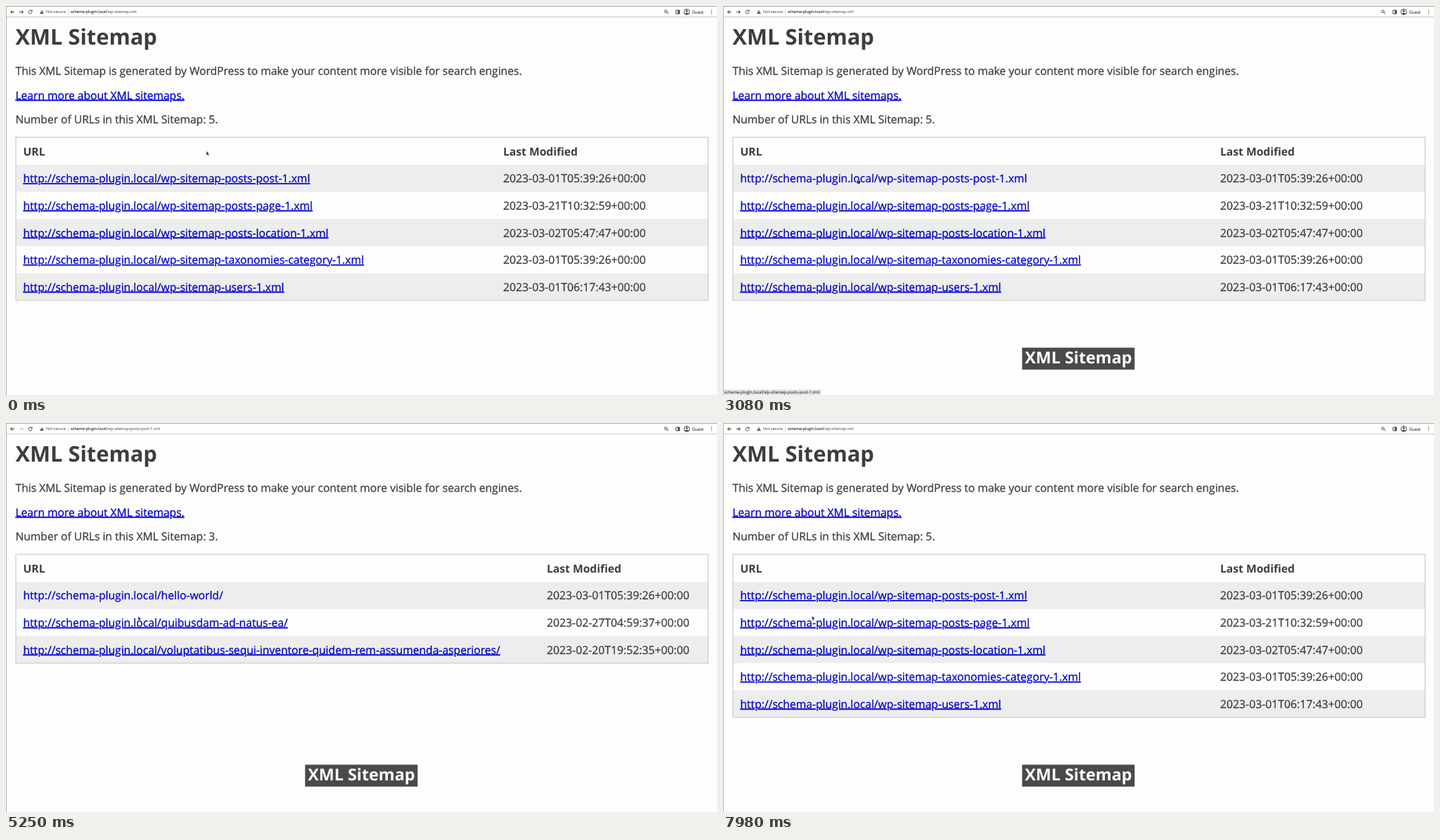
An HTML page that plays this animation: 1011x554 px, repeating every 8 s.

```html
<!DOCTYPE html>
<html lang="en">
<head>
<meta charset="utf-8">
<title>XML Sitemap</title>
<style>
html, body { margin: 0; width: 100%; height: 100%; overflow: hidden; background: #fdfdfd; }
svg { display: block; width: 1011px; height: 554px; color: #3d3d3d; }
text, tspan { fill: currentColor; stroke: currentColor; stroke-width: .018em; }
text { font-family: "Open Sans", "Noto Sans", sans-serif; text-rendering: geometricPrecision; white-space: pre; }
.bold { font-weight: 700; stroke: none; }
.link { color: #0000d0; text-decoration: underline 1.3px; text-underline-offset: 1.6px; }
.hover { text-decoration: none; }
.host { color: #222; }
.dim { color: #666; }
.light { color: #fff; }
.icon { fill: none; stroke: #444; stroke-width: 1; }
</style>
</head>
<body>
<svg id="stage" viewBox="0 0 1011 554"></svg>
<script>
const LOOP = 8000, STEP = 70, ROW = 38.6;
const HOST = 'schema-plugin.local';

const indexPage = {
  path: '/wp-sitemap.xml', dateX: 707,
  rows: [
    ['wp-sitemap-posts-post-1.xml', '2023-03-01T05:39:26', 433],
    ['wp-sitemap-posts-page-1.xml', '2023-03-21T10:32:59', 437],
    ['wp-sitemap-posts-location-1.xml', '2023-03-02T05:47:47', 460],
    ['wp-sitemap-taxonomies-category-1.xml', '2023-03-01T05:39:26', 511],
    ['wp-sitemap-users-1.xml', '2023-03-01T06:17:43', 395]
  ]
};
const postsPage = {
  path: '/wp-sitemap-posts-post-1.xml', dateX: 769,
  rows: [
    ['hello-world/', '2023-03-01T05:39:26', 312],
    ['quibusdam-ad-natus-ea/', '2023-02-27T04:59:37', 399],
    ['voluptatibus-sequi-inventore-quidem-rem-assumenda-asperiores/', '2023-02-20T19:52:35', 700]
  ]
};

// Pointer path: time, x, y of the hot spot
const pointerPath = [
  [0, 285, 206.5], [1890, 241, 229], [2590, 197, 244], [2730, 191.5, 247],
  [4900, 191.5, 247], [5180, 190, 253], [5250, 188, 275], [5390, 180, 318],
  [5530, 172, 325], [6090, 72, 128], [6160, 64, 69], [6860, 8, 11],
  [7280, 8, 11], [7840, 126.5, 274.5], [LOOP, 126.5, 274.5]
];

function pointerAt(t) {
  const i = Math.max(1, pointerPath.findIndex(p => p[0] >= t));
  const [t0, x0, y0] = pointerPath[i - 1], [t1, x1, y1] = pointerPath[i];
  const k = Math.max(0, (t - t0) / (t1 - t0));
  return [x0 + (x1 - x0) * k, y0 + (y1 - y0) * k];
}

const text = (x, y, size, str, cls = '') =>
  `<text x="${x}" y="${y}" font-size="${size}" class="${cls}">${str}</text>`;
const rect = (x, y, w, h, fill) =>
  `<rect x="${x}" y="${y}" width="${w}" height="${h}" fill="${fill}"/>`;
const icon = (d, extra = '') => `<path class="icon" d="${d}" ${extra}/>`;

// Row number of the link under a point; -1 is the link above the table
function linkAt([x, y], page) {
  if (Math.abs(y - 127) < 9 && x > 14 && x < 253) return -1;
  const i = page.rows.findIndex((r, n) => Math.abs(y - 245.7 - n * ROW) < 9 && x > 24 && x < r[2]);
  return i < 0 ? null : i;
}

function toolbar(page, loading) {
  const forward = page === indexPage ? '' : 'style="stroke:#bbb"';
  return rect(0, 0, 1011, 15.5, '#fff') + rect(0, 0, 1011, .8, '#999') + rect(0, 15.2, 1011, .9, '#c4c4c4') +
    icon('M12 8.5H6.7M9 6L6.5 8.5L9 11') +
    icon('M19 8.5H24.3M22 6L24.5 8.5L22 11', forward) +
    (loading ? icon('M32.2 6L37 10.8M37 6L32.2 10.8')
      : icon('M36.6 6.9A2.5 2.5 0 1 0 37 9.3M37.2 5.6V7.6H35.2')) +
    '<path d="M51 5.8L53.9 11H48.1Z" fill="#555"/>' + rect(50.7, 7.6, .6, 1.6, '#fff') +
    text(57, 10.4, 5.5, 'Not secure', 'dim') + rect(88, 5, .6, 7.5, '#bbb') +
    text(92, 10.4, 5.5, `<tspan class="host">${HOST}</tspan><tspan class="dim">${page.path}</tspan>`) +
    icon('M940.1 7.7A1.8 1.8 0 1 0 936.5 7.7A1.8 1.8 0 1 0 940.1 7.7M939.7 9L942 11.3') +
    icon('M952.8 6H957.8V11H952.8Z') + rect(955.3, 6, 2.5, 5, '#444') +
    '<circle cx="968" cy="8.4" r="4" class="icon"/><circle cx="968" cy="7.2" r="1.4" fill="#444"/>' +
    '<path d="M965.2 10.7Q968 8.4 970.8 10.7Q968 13 965.2 10.7" fill="#444"/>' +
    text(975.5, 10.7, 6, 'Guest') +
    [6, 8.4, 10.8].map(y => `<circle cx="1003.2" cy="${y}" r=".65" fill="#444"/>`).join('');
}

function content(page, hover) {
  const { rows, dateX } = page;
  const cls = i => 'link' + (hover === i ? ' hover' : '');
  const tableBottom = 226.2 + rows.length * ROW;
  return text(13.5, 55, 30.8, 'XML Sitemap', 'bold') +
    text(13.5, 98, 15.62, 'This XML Sitemap is generated by WordPress to make your content more visible for search engines.') +
    text(13.5, 132.5, 15.6, 'Learn more about XML sitemaps.', cls(-1)) +
    text(13.5, 167, 15.6, `Number of URLs in this XML Sitemap: ${rows.length}.`) +
    text(24.5, 212.8, 15.65, 'URL', 'bold') + text(dateX, 212.8, 15.65, 'Last Modified', 'bold') +
    rows.map(([slug, date], i) => {
      const y = 226.2 + i * ROW;
      return (i % 2 ? '' : rect(14, y, 984, ROW, '#ededed')) +
        text(24.5, y + 25.1, 15.65, `http://${HOST}/${slug}`, cls(i)) +
        text(dateX, y + 25.1, 15.78, date + '+00:00');
    }).join('') +
    `<rect x="14" y="187" width="984.4" height="${tableBottom - 187}" fill="none" stroke="#ccc" stroke-width="1.2"/>`;
}

function pointer([x, y], overLink, blank) {
  let shape;
  if (overLink) {
    shape = '<path d="M-.6 -.6V3.2L-1.8 2.6L-2.2 3.4L-.2 6.4H3.2L4 3.4V1.8L.7 1.3V-.6Z" fill="#333" stroke="#fff" stroke-width=".5"/>';
  } else if (!blank && y > 25 && y < 73) {
    shape = icon('M-1.3 -3.2H1.3M0 -3.2V3.2M-1.3 3.2H1.3', 'style="stroke-width:.7"');
  } else {
    shape = '<path d="M0 0V6.2L1.4 5L2.4 7.3L3.4 6.8L2.4 4.7H4.3Z" fill="#222" stroke="#fff" stroke-width=".4"/>';
  }
  return `<g transform="translate(${x} ${y})">${shape}</g>`;
}

function statusBar(width, str) {
  return rect(0, 546, width, 8, '#e4e4e4') + text(2, 552.4, 5.85, str);
}

function render(t) {
  const page = t >= 4270 && t < 7210 ? postsPage : indexPage;
  const loading = t >= 4130 && t < 4550;
  const blank = t >= 4270 && t < 4550;
  const spot = pointerAt(t);
  // Link styling trails the pointer by one step
  const hover = linkAt(pointerAt(Math.max(0, t - STEP)), page);
  let out = rect(0, 0, 1011, 554, '#fdfdfd') + toolbar(page, loading);
  if (!blank) out += content(page, hover);
  if (t >= 2870) out += rect(425.3, 486.6, 160, 31.2, '#4a4a4a') + text(429.3, 509.3, 23.3, 'XML Sitemap', 'bold light');
  if (t >= 2660 && t < 4200) out += statusBar(140, HOST + postsPage.path);
  else if (t >= 4200 && t < 4550) out += statusBar(337, `Waiting for ${HOST}…`);
  out += rect(0, 0, .9, 554, '#aaa');
  return out + pointer(spot, !blank && linkAt(spot, page) !== null, blank);
}

const stage = document.getElementById('stage');
let shown = -1;
function frame() {
  const t = Math.floor(performance.now() % LOOP / STEP) * STEP;
  if (t !== shown) stage.innerHTML = render(shown = t);
  requestAnimationFrame(frame);
}
frame();
</script>
</body>
</html>
```
